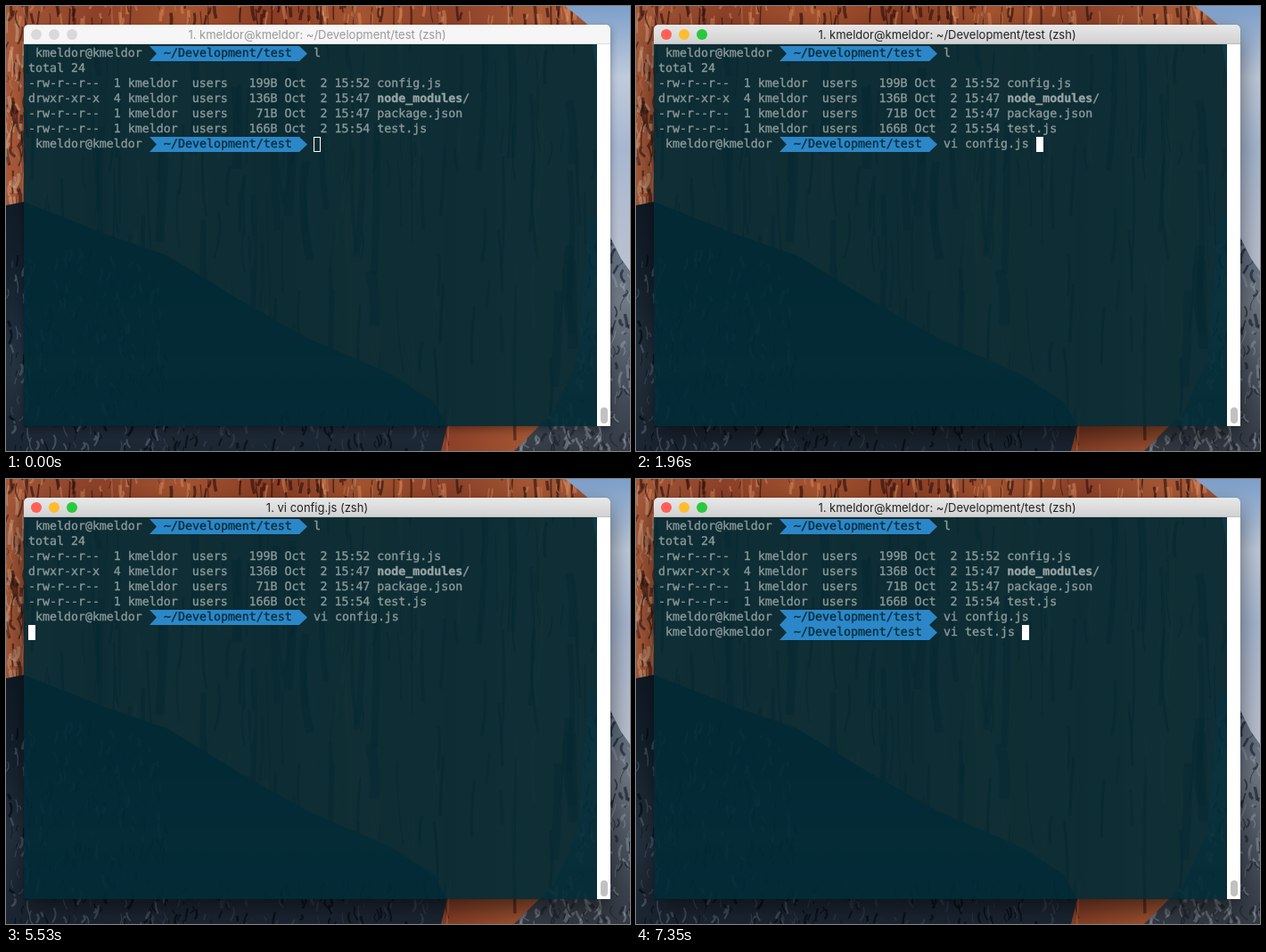
These frames come from a looping animation (700 by 500 pixels, 8000 ms). An HTML page with a canvas:

```html
<!DOCTYPE html>
<html lang="en">
<head>
<meta charset="utf-8">
<title>Terminal session</title>
<style>
  html, body { margin: 0; width: 100%; height: 100%; overflow: hidden; background: #0f1c28; }
  #stage { position: relative; width: 700px; height: 500px; overflow: hidden; }
  #photo { position: absolute; left: 0; top: 0; }
  #win {
    position: absolute; left: 20px; top: 21px; width: 658px; height: 451px;
    border-radius: 5px 5px 0 0; box-shadow: 0 12px 28px rgba(0, 0, 0, .55), 0 0 1px rgba(0, 0, 0, .5);
  }
  #bar {
    position: absolute; left: 0; top: 0; width: 658px; height: 22px; box-sizing: border-box;
    border-radius: 5px 5px 0 0; background: linear-gradient(#e8e8e8, #d2d2d2);
    border-bottom: 1px solid #bdbdbd;
  }
  #title {
    position: absolute; left: 0; top: 0; width: 658px; text-align: center; white-space: pre;
    font: 13px/22px Inter, Roboto, sans-serif; color: #222;
  }
  #bar i { position: absolute; top: 5px; width: 12px; height: 12px; border-radius: 50%; }
  #bar i:nth-of-type(1) { left: 8px; background: #ff5f57; }
  #bar i:nth-of-type(2) { left: 28px; background: #febc2e; }
  #bar i:nth-of-type(3) { left: 48px; background: #28c83f; }
  #win.blur { box-shadow: 0 4px 10px rgba(0, 0, 0, .35), 0 0 1px rgba(0, 0, 0, .4); }
  .blur #bar { background: #f6f6f6; border-color: #dcdcdc; }
  .blur #bar i { background: #d9d9d9; }
  .blur #title { color: #999; }
  #track { position: absolute; left: 643px; top: 22px; width: 15px; height: 429px; background: #fff; }
  #track b { position: absolute; left: 4px; top: 408px; width: 8px; height: 18px; border-radius: 4px; background: #c1c1c1; }
  #term {
    position: absolute; left: 0; top: 22px; width: 643px; height: 429px; overflow: hidden;
    background: rgba(0, 43, 54, .9); color: #8b9a9b;
    font: 13.288px/17px "DejaVu Sans Mono", "Liberation Mono", monospace;
    text-rendering: geometricPrecision; font-variant-ligatures: none; font-kerning: none;
    -webkit-text-stroke: .35px;
  }
  .row { position: absolute; left: 5px; height: 17px; white-space: pre; }
  .path {
    position: absolute; left: 136px; top: 0; width: 161px; height: 17px; padding-left: 16px;
    background: #2b87c8; color: #062e3b;
    clip-path: polygon(0 0, 168px 0, 177px 50%, 168px 100%, 0 100%, 8px 50%);
  }
  .cmd { position: absolute; left: 320px; top: 0; }
  .dir { font-weight: bold; color: #97a5a5; }
  .num { color: #7d8e90; }
  .key { color: #2aa198; }
  .str { color: #dc322f; }
  .cursor { position: absolute; width: 8px; height: 17px; background: #fff; color: #0a2f3a; }
  .cursor.open { background: none; box-sizing: border-box; border: 1px solid #fff; }
</style>
</head>
<body>
<div id="stage">
  <canvas id="photo" width="700" height="500"></canvas>
  <div id="win">
    <div id="bar"><i></i><i></i><i></i><div id="title"></div></div>
    <div id="term"></div>
    <div id="track"><b></b></div>
  </div>
</div>
<script>
const $ = id => document.getElementById(id);

// ---- backdrop: cliff, sky, far slope and shaded forest ----
const g = $('photo').getContext('2d');
let seed = 11;
const rnd = (a = 1, b = 0) => {
  seed = (seed * 16807) % 2147483647;
  return b + (a - b) * seed / 2147483647;
};

function grad(x0, y0, x1, y1, ...colors) {
  const lg = g.createLinearGradient(x0, y0, x1, y1);
  colors.forEach((c, i) => lg.addColorStop(i / (colors.length - 1), c));
  return lg;
}

function shape(fill, pts, detail) {
  g.save();
  g.beginPath();
  pts.forEach(([x, y]) => g.lineTo(x, y));
  g.closePath();
  g.fillStyle = fill;
  g.fill();
  g.clip();
  if (detail) detail();
  g.restore();
}

function strokes(n, colors, x0, x1, y0, y1, dx, len, width) {
  for (let i = 0; i < n; i++) {
    const x = rnd(x1, x0), y = rnd(y1, y0), l = rnd(len, len / 4);
    g.strokeStyle = colors[i % colors.length];
    g.lineWidth = rnd(width, .6);
    g.beginPath();
    g.moveTo(x, y);
    g.quadraticCurveTo(x + rnd(dx, -dx), y + l / 2, x + rnd(dx, -dx), y + l);
    g.stroke();
  }
}

function paintPhoto() {
  shape(grad(0, 0, 0, 320, '#7d9fca', '#bfcbdc', '#a7b7d0', '#b4bed0', '#bec3d0'),
    [[600, 0], [700, 0], [700, 330], [600, 330]]);
  shape(grad(0, 0, 700, 0, '#a65a3a', '#8c4028', '#a55430', '#8a3d24', '#a3532f', '#8c4128', '#a85935', '#8f4c36'),
    [[0, 0], [627, 0], [641, 11], [655, 23], [663, 80], [669, 180], [677, 280], [677, 500], [0, 500]],
    () => {
      strokes(40, ['rgba(40,14,12,.5)'], 100, 660, 20, 320, 8, 190, 12);
      strokes(230, ['rgba(45,14,10,.6)', 'rgba(205,125,82,.4)', 'rgba(70,26,16,.55)'],
        0, 670, -40, 460, 5, 90, 4);
      strokes(130, ['rgba(50,18,14,.65)', 'rgba(222,142,96,.5)'], 0, 640, -14, 14, 3, 24, 4);
      strokes(70, ['rgba(50,20,16,.6)', 'rgba(214,170,140,.5)'], 0, 22, 0, 220, 6, 30, 4);
    });
  shape(grad(0, 250, 0, 500, '#5a6a80', '#6f7883', '#48525f', '#353b45'),
    [[655, 235], [678, 260], [690, 284], [700, 298], [700, 500], [570, 500], [615, 455], [640, 400]],
    () => strokes(230, ['rgba(26,34,46,.65)', 'rgba(160,165,172,.45)'], 575, 700, 250, 500, 7, 18, 4));
  shape(grad(0, 205, 0, 500, '#0f1a25', '#14212e', '#253240', '#1b2633'),
    [[0, 224], [20, 220], [116, 258], [180, 280], [267, 333], [340, 374], [433, 414], [480, 445], [495, 472], [488, 500], [0, 500]],
    () => {
      strokes(260, ['rgba(104,118,136,.5)', 'rgba(5,10,18,.7)'], 0, 180, 270, 500, 5, 18, 3);
      strokes(130, ['rgba(66,80,98,.4)', 'rgba(5,10,18,.7)'], 150, 490, 450, 500, 5, 16, 3);
    });
}

// ---- terminal content ----
const USER = 'kmeldor';
const PATH = '~/Development/test';
const HOME = `1. ${USER}@${USER}: ${PATH} `;
const EDIT = '1. vi config.js (zsh)';
const ROWS = 25;

const span = (cls, text) => `<span class="${cls}">${text}</span>`;
const prompt = cmd => ` ${USER}@${USER} ` + span('path', PATH) + span('cmd', cmd);
const entry = (mode, links, size, time, name) =>
  `${mode}  ${links} ${USER}  users   ${size.padStart(4)} Oct  2 ${time} ${name}`;

const listing = [
  prompt('l'),
  'total 24',
  entry('-rw-r--r--', 1, '199B', '15:52', 'config.js'),
  entry('drwxr-xr-x', 4, '136B', '15:47', span('dir', 'node_modules') + '/'),
  entry('-rw-r--r--', 1, '71B', '15:47', 'package.json'),
  entry('-rw-r--r--', 1, '166B', '15:54', 'test.js')
];

const code = [
  "var tb = require('tb');",
  "var config = tb('config');",
  '',
  'config',
  '  .children()',
  "    .stringNode('name').isRequired().end()",
  "    .stringNode('version').isRequired().end()",
  '  .end()',
  ';',
  '',
  'module.exports = config;'
];

const paint = line => line
  .replace(/'[^']*'/g, s => span('str', s))
  .replace(/^var/, s => span('key', s));

function shell(cmds, opt = {}) {
  const last = cmds[cmds.length - 1];
  const rows = listing.concat(cmds.map(prompt));
  const cursor = opt.waiting ? [rows.length, 0] : [rows.length - 1, 40 + last.length];
  return { title: HOME + '(zsh)', rows, cursor, ...opt };
}

function editor(status, cursor, under = '') {
  const rows = code.map((line, i) => span('num', String(i + 1).padStart(2)) + ' ' + paint(line));
  while (rows.length < ROWS - 1) rows.push('~');
  rows.push(status);
  return { title: EDIT, rows, cursor, under };
}

const FIRST = 'vi config.js';
const steps = [];
const at = (time, state) => steps.push([time, state]);

function type(start, text, from, done) {
  for (let n = from; n <= text.length; n++)
    at(start + (n - from) * 70, shell([...done, text.slice(0, n)]));
}

at(0, shell([''], { blur: true }));
at(420, shell(['']));
at(1330, shell(['vi']));
type(1470, 'vi conf', 3, []);
at(1960, shell([FIRST + ' ']));
at(2520, shell([FIRST], { title: EDIT, waiting: true }));
at(2590, editor('"config.js" 11L, 199C', [0, 3], 'v'));
at(5180, editor(':', [24, 1]));
at(5390, editor(':q', [24, 2]));
at(5530, shell([FIRST], { title: EDIT, waiting: true }));
at(5600, shell([FIRST, ''], { title: HOME + '(vim)' }));
at(6160, shell([FIRST, 'v'], { title: HOME + '(vim)' }));
at(6230, shell([FIRST, 'vi'], { title: HOME + '(vim)' }));
at(6300, shell([FIRST, 'vi']));
at(6370, shell([FIRST, 'vi ']));
type(6930, 'vi test', 4, [FIRST]);
at(7350, shell([FIRST, 'vi test.js ']));

// ---- playback ----
const LOOP = 8000;
let shown = null;

function render(state) {
  const [row, col] = state.cursor;
  $('win').className = state.blur ? 'blur' : '';
  $('title').textContent = state.title;
  $('term').innerHTML =
    state.rows.map((html, i) => `<div class="row" style="top:${2 + i * 17}px">${html}</div>`).join('') +
    `<div class="cursor${state.blur ? ' open' : ''}" style="left:${5 + col * 8}px;top:${2 + row * 17}px">${state.under || ''}</div>`;
}

const origin = performance.now();

function tick() {
  const t = (performance.now() - origin) % LOOP;
  let state = steps[0][1];
  for (const [time, s] of steps) if (time <= t) state = s;
  if (state !== shown) render(shown = state);
  requestAnimationFrame(tick);
}

paintPhoto();
tick();
</script>
</body>
</html>
```
